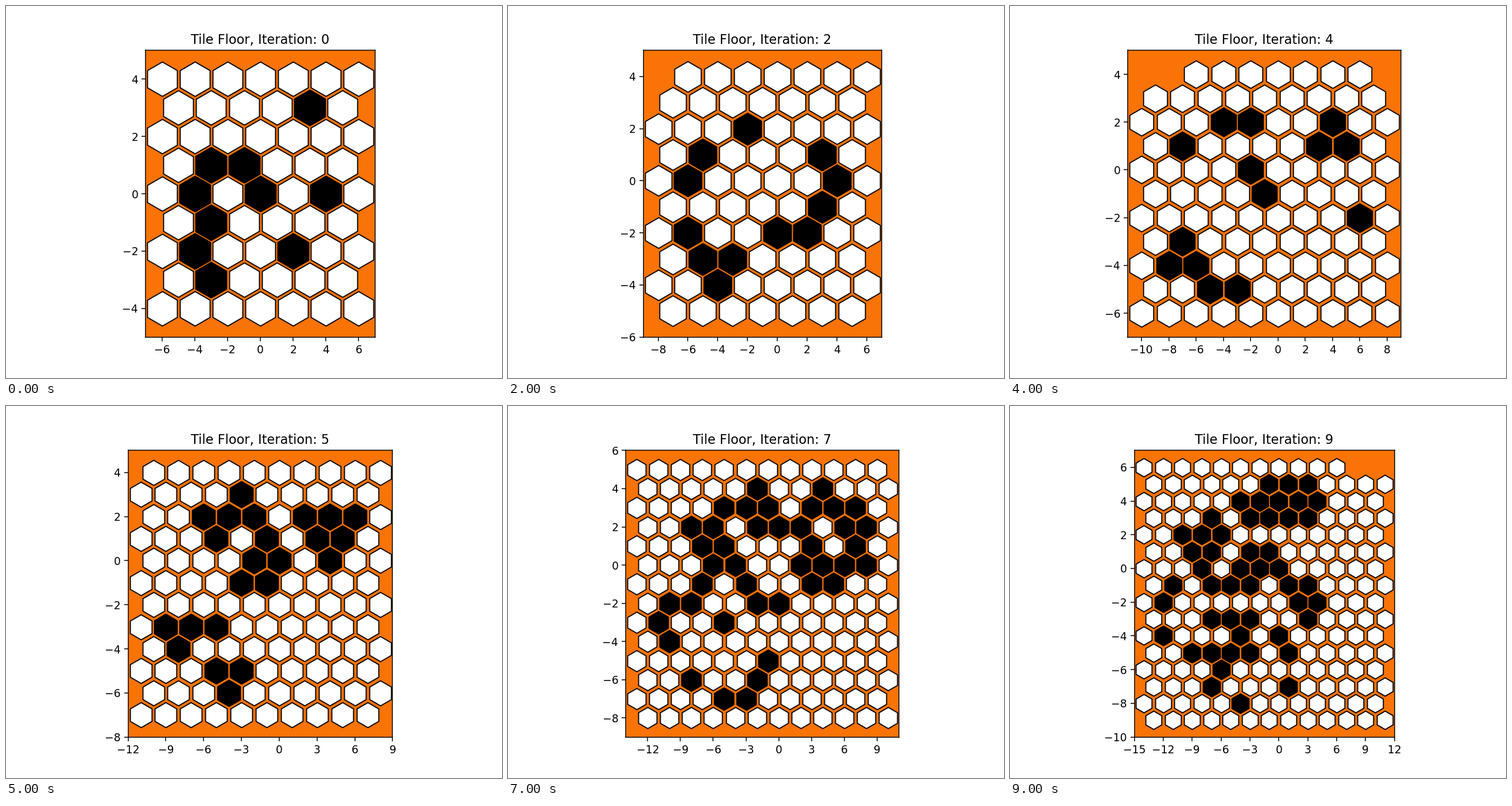
Animation, 864 px wide and 648 px high, one loop 10 s. Source, as a matplotlib script:

```python
import matplotlib.pyplot as plt
from matplotlib.animation import FuncAnimation
from matplotlib.ticker import MaxNLocator

DAYS = 10
MARGIN_SCALE = 1.0006
STEPS = [(2, 0), (-2, 0), (1, 1), (1, -1), (-1, 1), (-1, -1)]
START = {(3, 3), (-3, 1), (-1, 1), (-4, 0), (0, 0), (4, 0),
         (-3, -1), (-4, -2), (2, -2), (-3, -3)}


def neighbours(tile):
    return {(tile[0] + dx, tile[1] + dy) for dx, dy in STEPS}


def evolve(black):
    near = black.union(*(neighbours(t) for t in black))
    nxt = set()
    for tile in near:
        n = len(neighbours(tile) & black)
        if n == 2 or (n == 1 and tile in black):
            nxt.add(tile)
    return nxt


def padded_floor(black):
    xs, ys = zip(*black)
    return {(x, y)
            for x in range(min(xs) - 2, max(xs) + 3)
            for y in range(min(ys) - 1, max(ys) + 2)
            if (x + y) % 2 == 0}


def simulate():
    days, black, tiles = [], START, set()
    for _ in range(DAYS):
        tiles = tiles | padded_floor(black)
        days.append((sorted(black), sorted(tiles - black)))
        black = evolve(black)
    return days


days = simulate()

fig, ax = plt.subplots(figsize=(6.4, 4.8), dpi=135)
fig.subplots_adjust(left=0.125 * MARGIN_SCALE, right=0.9 * MARGIN_SCALE,
                    bottom=0.11 * MARGIN_SCALE, top=0.88 * MARGIN_SCALE)
ax.set_facecolor("xkcd:orange")
ax.set_aspect(1.75)
ax.xaxis.set_major_locator(MaxNLocator(integer=True))
white_hexes = ax.scatter([], [], marker="h", facecolors="white",
                         edgecolors="black", linewidths=1)
black_hexes = ax.scatter([], [], marker="h", facecolors="black",
                         edgecolors="black", linewidths=2)
title = ax.set_title("")


def draw(day):
    black, white = days[day]
    xs, ys = zip(*(black + white))
    size = 256 / (max(ys) - min(ys))
    for hexes, tiles in ((white_hexes, white), (black_hexes, black)):
        hexes.set_offsets(tiles)
        hexes.set_sizes([size ** 2])
    ax.set_xlim(min(xs) - 1, max(xs) + 1)
    ax.set_ylim(min(ys) - 1, max(ys) + 1)
    title.set_text(f"Tile Floor, Iteration: {day}")
    return white_hexes, black_hexes, title


anim = FuncAnimation(fig, draw, frames=DAYS, init_func=lambda: draw(0),
                     interval=1000, repeat=True, repeat_delay=0)
plt.show()
```
